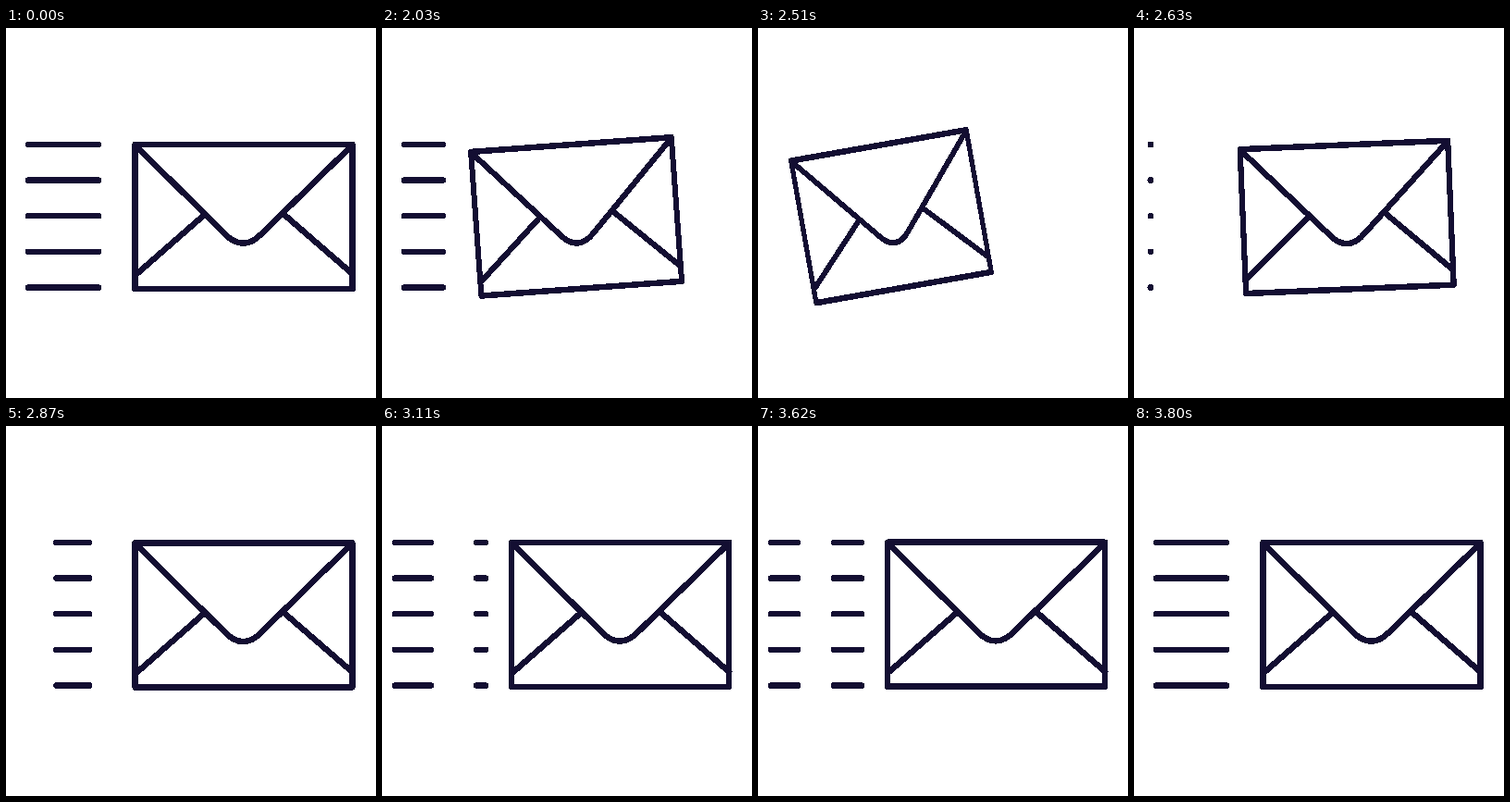
An HTML page for the animation above (3830 ms loop, 400 px wide and 400 px high).

```html
<!DOCTYPE html>
<html lang="en">
<head>
<meta charset="utf-8">
<title>Flying envelope</title>
<style>
  html, body { margin: 0; width: 100%; height: 100%; overflow: hidden; background: #fff; }
  svg { display: block; width: 100%; height: 100%; }
</style>
</head>
<body>
<svg viewBox="0 0 400 400" fill="none" stroke="#130e32" stroke-width="6.5" stroke-linecap="round" stroke-linejoin="round" shape-rendering="crispEdges">
  <path id="wind"/>
  <g id="envelope">
    <path d="M-117.5-78H117.5V78H-117.5Z"/>
    <path d="M-117-77L-20.7 18.2C-7.7 32.2 6.3 32.2 19.5 18.2L117-77"/>
    <path d="M-43.8-1L-115.5 61.8M44-2L117.5 61.8"/>
  </g>
</svg>
<script>
const LOOP = 3830, REST = 2030, STEP = 30;
const PULLED = 18, LINES_BACK = 21, LAST = 60;
const TRACK = { left: 14, length: 98 };
const ROWS = [126, 164.5, 203.2, 241.8, 280.5];

// Wind keys: [step, value]; the centre runs left and wraps on the track.
const CENTRE = [[21, 18], [37, -69.5], [48, -133], [60, -232]];
const LENGTH = [[21, 0.5], [32, 49], [50, 48], [60, 76]];

const wind = document.getElementById('wind');
const envelope = document.getElementById('envelope');

function keyed(keys, at) {
  let i = 1;
  while (i < keys.length - 1 && at > keys[i][0]) i++;
  const [a, from] = keys[i - 1], [b, to] = keys[i];
  return from + (to - from) * (at - a) / (b - a);
}

function pullBack(step) {
  if (step === 0 || step >= LAST) return 0;
  return step <= PULLED ? 1 - 0.585 ** step : 0.621 ** (step - PULLED);
}

function windSegments(step, pull) {
  if (step === 0 || step >= LAST) return [[24, 100]];
  if (step < LINES_BACK) {
    const end = 100 - 82 * pull;
    return step <= PULLED && end >= 24 ? [[24, end]] : [];
  }
  const { left, length } = TRACK;
  const size = keyed(LENGTH, step);
  const offset = keyed(CENTRE, step) - size / 2 - left;
  const start = ((offset % length) + length) % length;
  const end = start + size;
  const parts = [[left + start, left + Math.min(end, length)]];
  if (end > length) parts.push([left, left + end - length]);
  return parts;
}

function draw(time) {
  const t = time % LOOP;
  const step = t < REST ? 0 : Math.floor((t - REST) / STEP) + 1;
  const pull = pullBack(step);

  // Slight tremble while flying.
  const shake = step > PULLED && step < LAST ? 0.7 * (1 - pull) : 0;
  const phase = (step - 37) * Math.PI * 2.5 / 11;
  const x = 257 - 113 * pull + shake * Math.cos(phase);
  const y = 204 - 0.3 * pull + shake * Math.sin(phase);
  envelope.setAttribute('transform',
    `translate(${x} ${y}) rotate(${-10 * pull}) scale(${1 - 0.182 * pull} 1)`);

  const parts = windSegments(step, pull);
  wind.setAttribute('d', ROWS.map(row =>
    parts.map(([a, b]) => `M${a} ${row}H${b}`).join('')).join(''));
}

const begin = performance.now();
function tick() {
  draw(performance.now() - begin);
  requestAnimationFrame(tick);
}
tick();
</script>
</body>
</html>
```
